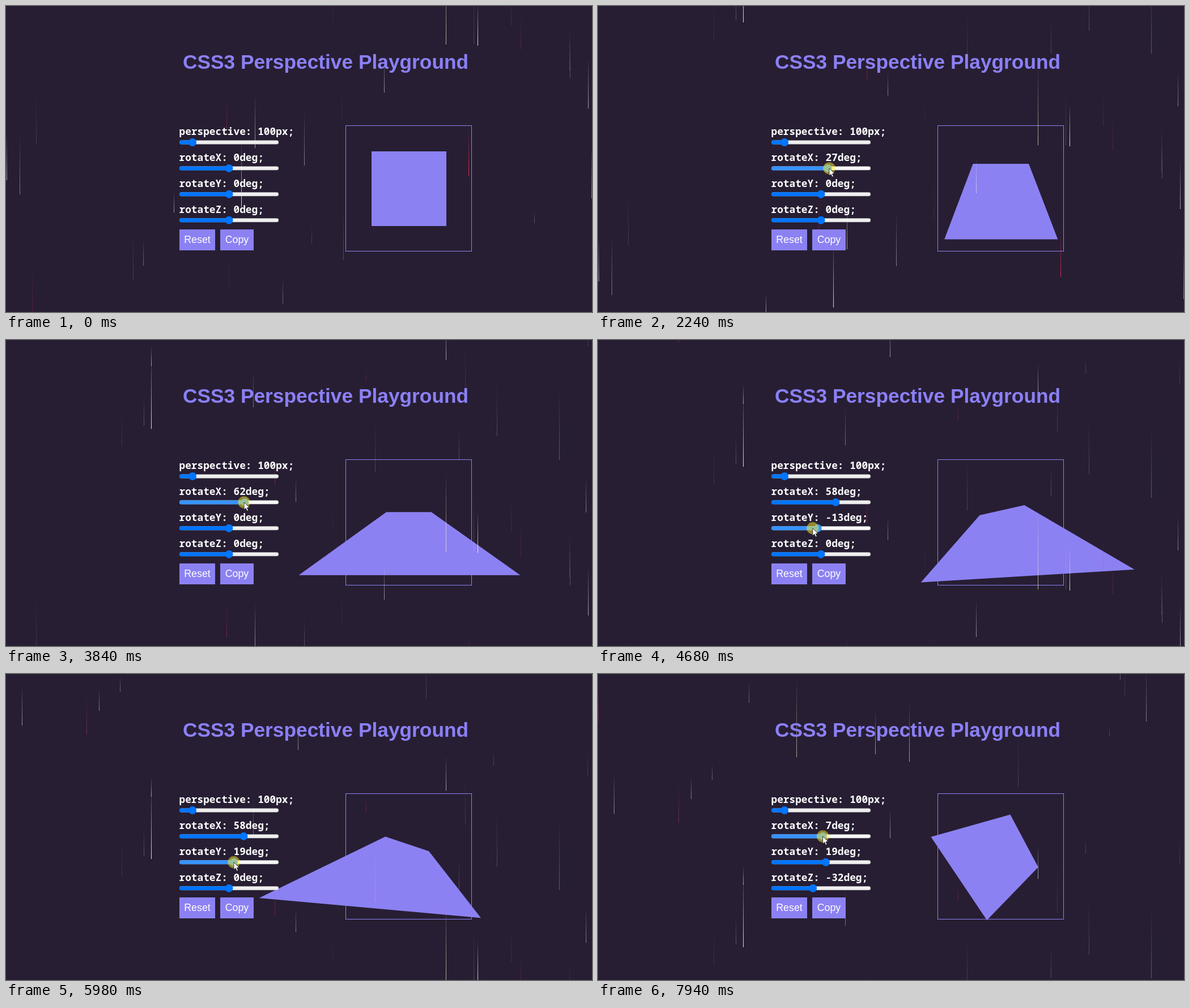
These frames come from a looping animation (1034 px wide and 541 px high, 8 s). An HTML page with a canvas:

```html
<!DOCTYPE html>
<html lang="en">
<head>
<meta charset="utf-8">
<title>CSS3 Perspective Playground</title>
<style>
  html, body { margin: 0; width: 100%; height: 100%; overflow: hidden; background: #271e33; }
  #stage { position: relative; width: 1034px; height: 541px; overflow: hidden; }
  #frame {
    position: absolute; left: 599px; top: 211px; width: 221px; height: 221px;
    border: 1px solid #8c81f4; perspective: 88px;
  }
  #box { position: absolute; left: 44.5px; top: 44.5px; width: 132px; height: 132px; background: #8c81f2; }
  canvas, svg { position: absolute; left: 0; top: 0; }
  h1, .button {
    position: absolute; margin: 0; white-space: nowrap; text-align: center;
    font-family: "Liberation Sans", Arial, sans-serif;
  }
  h1 { left: 0; width: 1128px; top: 78px; line-height: 42px; font-size: 35.3px; color: #8b80f6; }
  .button { top: 395px; line-height: 37px; font-size: 17.8px; color: #fff; background: #8c81f2; }
  .label { font: 600 17.8px "Noto Sans Mono", "DejaVu Sans Mono", monospace; fill: #fff; }
</style>
</head>
<body>
<div id="stage">
  <div id="frame"><div id="box"></div></div>
  <canvas id="rain" width="1034" height="541"></canvas>
  <h1>CSS3 Perspective Playground</h1>
  <div class="button" style="left:306px;width:63px">Reset</div>
  <div class="button" style="left:378px;width:59px">Copy</div>
  <svg width="1034" height="541">
    <g id="sliders"></g>
    <g id="pointer">
      <circle id="press" r="10.7" fill="#fff028" fill-opacity=".5"/>
      <path d="M0 0V13.4L3.1 10.5L5.2 15.4L7.5 14.4L5.4 9.6H9.6Z" fill="#fff" stroke="#111" stroke-width=".8"/>
    </g>
  </svg>
</div>
<script>
const LOOP = 8000;
const FALL = 0.0796; // px per ms
const LEAD = 130;    // ms the pointer runs ahead of the thumb
const ENTER = { time: 900, x: 100, y: 150 };
const $ = id => document.getElementById(id);
const mix = (a, b, k) => a + (b - a) * k;

// Sliders

function makeSlider(name, unit, min, max, value, row) {
  const y = 241 + row * 45.9;
  const g = document.createElementNS("http://www.w3.org/2000/svg", "g");
  g.innerHTML = `<text class="label" x="305.5" y="${y - 12.8}"></text>
    <rect x="306.3" y="${y - 3.2}" width="174.6" height="6.4" rx="3" stroke="#b2b2b2" stroke-width=".6"/>
    <rect x="306" y="${y - 3.5}" height="7" rx="3"/>
    <circle cy="${y}" r="7"/>`;
  $("sliders").append(g);
  const [label, track, fill, thumb] = g.children;
  return { name, unit, min, max, value, y, label, track, fill, thumb };
}

const depth = makeSlider("perspective", "px", 0, 1000, 100, 0);
const [turnX, turnY, turnZ] = ["X", "Y", "Z"].map(
  (axis, i) => makeSlider("rotate" + axis, "deg", -180, 180, 0, i + 1));
const sliders = [depth, turnX, turnY, turnZ];

const thumbX = (s, value) => mix(313, 474, (value - s.min) / (s.max - s.min));

// Each drag runs through [time, angle] poses, then holds briefly.
const drags = [
  { slider: turnX, poses: [[1600, 0], [2930, 56], [3840, 62], [4050, 58]] },
  { slider: turnY, poses: [[4600, 0], [5050, -70], [5290, -53], [5980, 19]] },
  { slider: turnZ, poses: [[6600, 0], [6950, -32]] },
  { slider: turnX, poses: [[7450, 58], [7940, 7]] }
];
for (const d of drags) {
  d.start = d.poses[0][0];
  d.end = d.poses.at(-1)[0] + 100;
}

function angle({ poses }, t) {
  const i = poses.findIndex(([time]) => time > t);
  if (i < 0) return poses.at(-1)[1];
  if (i === 0) return poses[0][1];
  const [t0, a] = poses[i - 1], [t1, b] = poses[i];
  return mix(a, b, (t - t0) / (t1 - t0));
}

const grip = (d, t) => ({ x: thumbX(d.slider, angle(d, t + LEAD)), y: d.slider.y });

// Follows the thumb while dragging, glides to the next one in between.
function pointerAt(t) {
  const i = drags.findIndex(d => t < d.end);
  const next = drags[i];
  if (!next) return grip(drags.at(-1), t);
  if (t >= next.start) return grip(next, t);
  const last = drags[i - 1];
  const from = last ? grip(last, last.end) : ENTER;
  const begin = last ? last.end : ENTER.time;
  const to = grip(next, next.start - LEAD);
  const left = 1 - Math.max(0, (t - begin) / (next.start - begin));
  const k = 1 - left ** 5;
  return { x: mix(from.x, to.x, k), y: mix(from.y, to.y, k) };
}

const looks = {
  idle: ["#efefef", "#0075ff"],
  hover: ["#e5e5e5", "#005cc8"],
  held: ["#f8f8f8", "#3793ff"]
};

function drawSlider(s, look) {
  const x = thumbX(s, s.value);
  const [track, fill] = looks[look];
  s.label.textContent = `${s.name}: ${s.value}${s.unit};`;
  s.track.setAttribute("fill", track);
  s.fill.setAttribute("fill", fill);
  s.fill.setAttribute("width", x - 306);
  s.thumb.setAttribute("fill", fill);
  s.thumb.setAttribute("cx", x);
}

// Rain

let seed = 11;
function random(low = 0, high = 1) {
  seed = (seed * 16807) % 2147483647;
  return mix(low, high, seed / 2147483647);
}

const RED = "236,50,92", CREAM = "255,244,205", WHITE = "255,255,255";
const drop = (tint, alpha, x, end, length) => ({ tint, alpha, x, end, length });

// A few bright streaks in front of an evenly spread faint shower.
const rain = [
  drop(CREAM, .7, 776, 68, 140),
  drop(CREAM, .9, 832, 70, 75),
  drop(WHITE, .85, 415, 355, 115),
  drop(RED, .9, 816, 301, 85),
  drop(RED, .8, 976, -94, 123),
  drop(CREAM, .9, 256, -149, 131),
  drop(CREAM, .65, 350, -485, 137)
];
const SHOWER = 54;
for (let i = 0; i < SHOWER; i++) {
  const tint = random() < .3 ? RED : WHITE;
  const end = mix(560, -LOOP * FALL, (i + random()) / SHOWER);
  rain.push(drop(tint, random(.12, .6), Math.floor(random(0, 1034)), end, random(20, 110)));
}

const ctx = $("rain").getContext("2d");
function drawRain(t) {
  ctx.clearRect(0, 0, 1034, 541);
  for (const { tint, alpha, x, end, length } of rain) {
    const bottom = Math.round(end + t * FALL), top = bottom - length;
    const fade = ctx.createLinearGradient(0, top, 0, bottom);
    fade.addColorStop(0, `rgba(${tint},0)`);
    fade.addColorStop(1, `rgba(${tint},${alpha})`);
    ctx.fillStyle = fade;
    ctx.fillRect(x, top, 1, length);
  }
}

function draw() {
  const t = performance.now() % LOOP;
  const { x, y } = pointerAt(t);
  const held = drags.find(d => t >= d.start && t < d.end)?.slider;
  const shown = t >= ENTER.time;

  for (const s of [turnX, turnY, turnZ]) s.value = 0;
  for (const d of drags) if (t >= d.start) d.slider.value = Math.round(angle(d, t));
  for (const s of sliders) {
    const over = shown && x > 306 && x < 481 && Math.abs(y - s.y) < 8;
    drawSlider(s, s === held ? "held" : over ? "hover" : "idle");
  }

  $("box").style.transform =
    `rotateX(${turnX.value}deg) rotateY(${turnY.value}deg) rotateZ(${turnZ.value}deg)`;
  $("pointer").setAttribute("transform", `translate(${x} ${y})`);
  $("pointer").style.display = shown ? "" : "none";
  $("press").style.display = held ? "" : "none";
  drawRain(t);
  requestAnimationFrame(draw);
}
draw();
</script>
</body>
</html>
```
